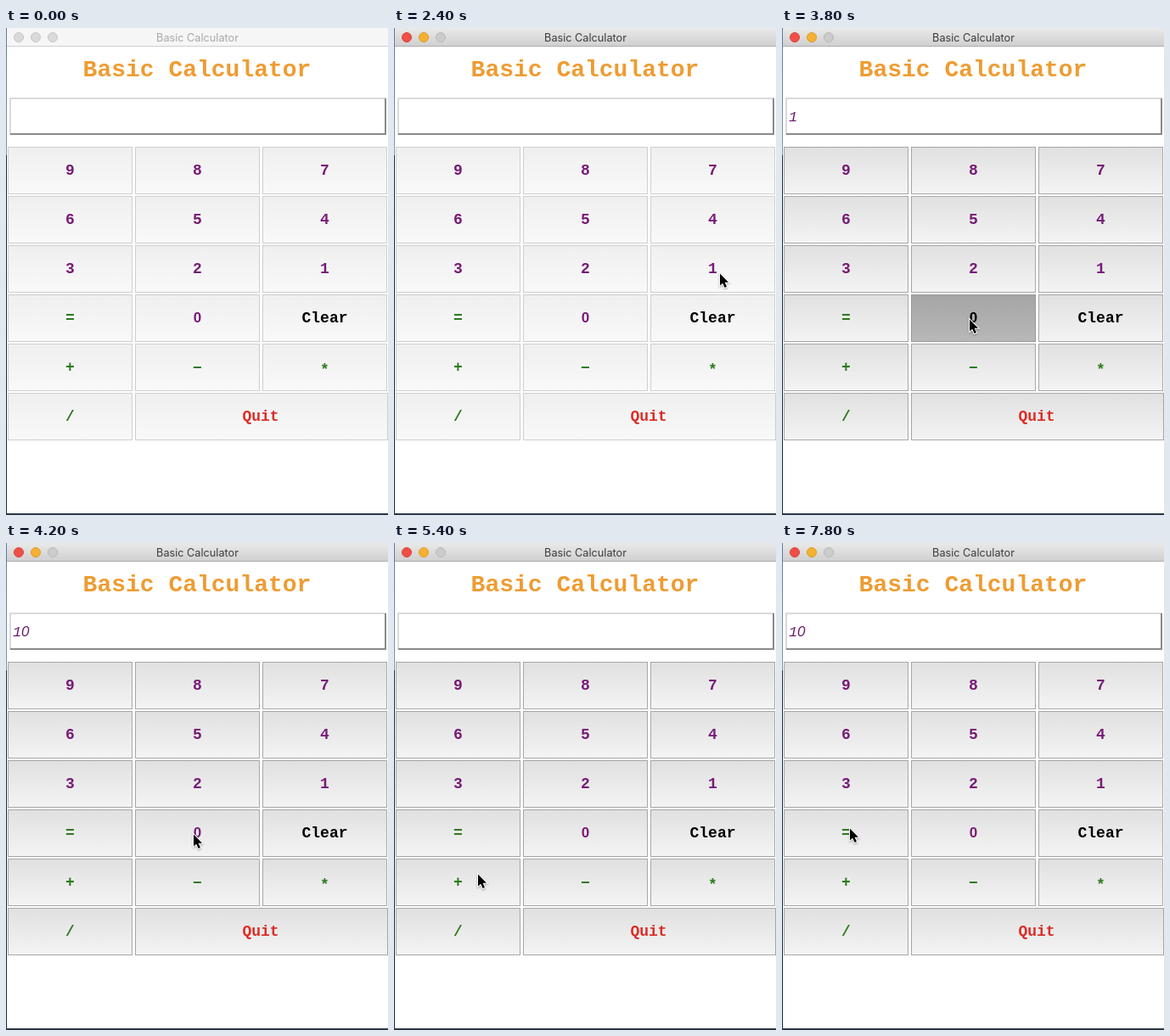
An HTML page with a canvas that plays this animation: 450x574 px, repeating every 8 s.

```html
<!DOCTYPE html>
<html lang="en">
<head>
<meta charset="utf-8">
<title>Basic Calculator</title>
<style>
html, body { margin: 0; width: 100%; height: 100%; overflow: hidden; background: #fff; }
canvas { display: block; width: 450px; height: 574px; }
</style>
</head>
<body>
<canvas id="stage" width="450" height="574"></canvas>
<script>
const ctx = document.getElementById('stage').getContext('2d');
const LOOP = 8000, TICK = 200;
const MONO = '"Liberation Mono", monospace';
const SANS = '"Liberation Sans", sans-serif';
const PURPLE = '#771b77', GREEN = '#2c7a1d', RED = '#dc2c26', ORANGE = '#ee9c32';

// label, column, row, colour, vertical nudge
const buttons = [
  ...[...'987654321'].map((d, i) => [d, i % 3, Math.floor(i / 3), PURPLE, 0]),
  ['=', 0, 3, GREEN, 0], ['0', 1, 3, PURPLE, 0], ['Clear', 2, 3, '#000', 0],
  ['+', 0, 4, GREEN, 0], ['−', 1, 4, GREEN, 1], ['*', 2, 4, GREEN, 3],
  ['/', 0, 5, GREEN, 0], ['Quit', 1, 5, RED, 0]
];

// time, x, y of the pointer tip
const pointerPath = [
  [800, 420, 500], [1200, 381, 406], [1600, 381, 406], [2200, 383, 288],
  [3000, 383, 288], [3600, 220, 342], [4200, 220, 342], [4800, 98, 389],
  [5600, 98, 389], [6200, 369, 287], [6400, 369, 287], [6800, 219, 341],
  [7000, 219, 341], [7400, 96, 384], [7800, 79, 335]
];
const presses = [[2800, '1'], [3800, '0'], [5200, '+'], [6800, '0']];
const entries = [[0, ''], [3000, '1'], [4000, '10'], [5400, ''], [6400, '1'], [7000, '10']];

function vertical(y, h, top, bottom) {
  const g = ctx.createLinearGradient(0, y, 0, y + h);
  g.addColorStop(0, top);
  g.addColorStop(1, bottom);
  return g;
}

function rect(x, y, w, h, fill) {
  ctx.fillStyle = fill;
  ctx.fillRect(x, y, w, h);
}

function text(s, x, y, font, fill, align = 'center') {
  ctx.font = font;
  ctx.fillStyle = fill;
  ctx.textAlign = align;
  ctx.fillText(s, x, y);
}

function drawWindow(active) {
  rect(0, 0, 450, 574, '#fff');
  rect(0, 0, 450, 21, active ? vertical(0, 21, '#e9e9e9', '#d0d0d0') : '#f6f6f6');
  rect(0, 21, 450, 1, active ? '#aeaeae' : '#d0d0d0');
  const lights = active
    ? [['#f04f47', '#d8433c'], ['#f5b133', '#dc9b2b'], ['#cbcbcb', '#b9b9b9']]
    : Array(3).fill(['#dadada', '#c6c6c6']);
  lights.forEach(([fill, edge], i) => {
    ctx.beginPath();
    ctx.arc(15 + 20 * i, 11, 5.5, 0, 7);
    ctx.fillStyle = fill;
    ctx.fill();
    ctx.lineWidth = 1;
    ctx.strokeStyle = edge;
    ctx.stroke();
  });
  text('Basic Calculator', 225.5, 16, '12.7px Inter, sans-serif', active ? '#3c3c3c' : '#a8a8a8');
  rect(0, 0, 1, 150, vertical(0, 150, '#5a7b9c', '#8196ab'));
  rect(0, 150, 1, 424, '#1b2a3e');
  rect(0, 572, 450, 2, '#2b3644');
  text('Basic Calculator', 225, 57, 'bold 28px ' + MONO, ORANGE);
}

function drawEntry(value) {
  rect(4, 82, 444, 44, '#dadada');
  rect(5, 124, 443, 2, '#8a8a8a');
  rect(446, 83, 2, 43, '#8a8a8a');
  rect(6, 84, 440, 40, '#fff');
  [...value].forEach((c, i) =>
    text(c, 8 + 10 * i, 109.5, 'italic 17px ' + (c === '0' ? SANS : MONO), '#6c1b6c', 'left'));
}

function drawButton([label, col, row, color, nudge], live, pressed) {
  const x = 2 + 150 * col, y = 140 + 58 * row, w = label === 'Quit' ? 298 : 147;
  const [edge, top, bottom] = pressed ? ['#999', '#a5a5a5', '#b9b8b9']
    : live ? ['#a6a6a6', '#e0e0e0', '#f4f4f4'] : ['#cecece', '#efefef', '#f9f9f9'];
  rect(x, y, w, 56, edge);
  rect(x + 1, y + 1, w - 2, 54, vertical(y, 56, top, bottom));
  const font = label === '0' ? 'bold 17px ' + SANS : 'bold 18px ' + MONO;
  text(label, x + w / 2 - (w > 200 ? 1 : 0), y + 32.5 + nudge, font, pressed ? '#000' : color);
}

function pointerAt(t) {
  if (t < pointerPath[0][0]) return null;
  const i = pointerPath.findIndex(p => p[0] >= t);
  if (i < 1) return pointerPath.at(i).slice(1);
  const [t0, x0, y0] = pointerPath[i - 1], [t1, x1, y1] = pointerPath[i];
  const u = (t - t0) / (t1 - t0), k = u * u * (3 - 2 * u);
  return [x0 + (x1 - x0) * k, y0 + (y1 - y0) * k];
}

function drawPointer(x, y) {
  ctx.save();
  ctx.translate(x + 1, y + 1.5);
  const arrow = new Path2D('M0 0V14L3.2 11.2L5.6 16.6L8 15.6L5.6 10.3H10Z');
  ctx.shadowColor = 'rgba(0,0,0,.35)';
  ctx.shadowBlur = 2;
  ctx.shadowOffsetY = 1;
  ctx.lineWidth = 2;
  ctx.strokeStyle = '#fff';
  ctx.stroke(arrow);
  ctx.shadowColor = 'transparent';
  ctx.fillStyle = '#000';
  ctx.fill(arrow);
  ctx.restore();
}

function draw(now) {
  const t = Math.floor(now % LOOP / TICK) * TICK;
  const press = presses.find(p => p[0] === t);
  drawWindow(t >= 1800);
  drawEntry(entries.findLast(e => e[0] <= t)[1]);
  for (const b of buttons) drawButton(b, t >= 2600, press && press[1] === b[0]);
  const tip = pointerAt(t);
  if (tip) drawPointer(...tip);
}

const start = performance.now();
function frame() {
  draw(performance.now() - start);
  requestAnimationFrame(frame);
}
frame();
</script>
</body>
</html>
```
